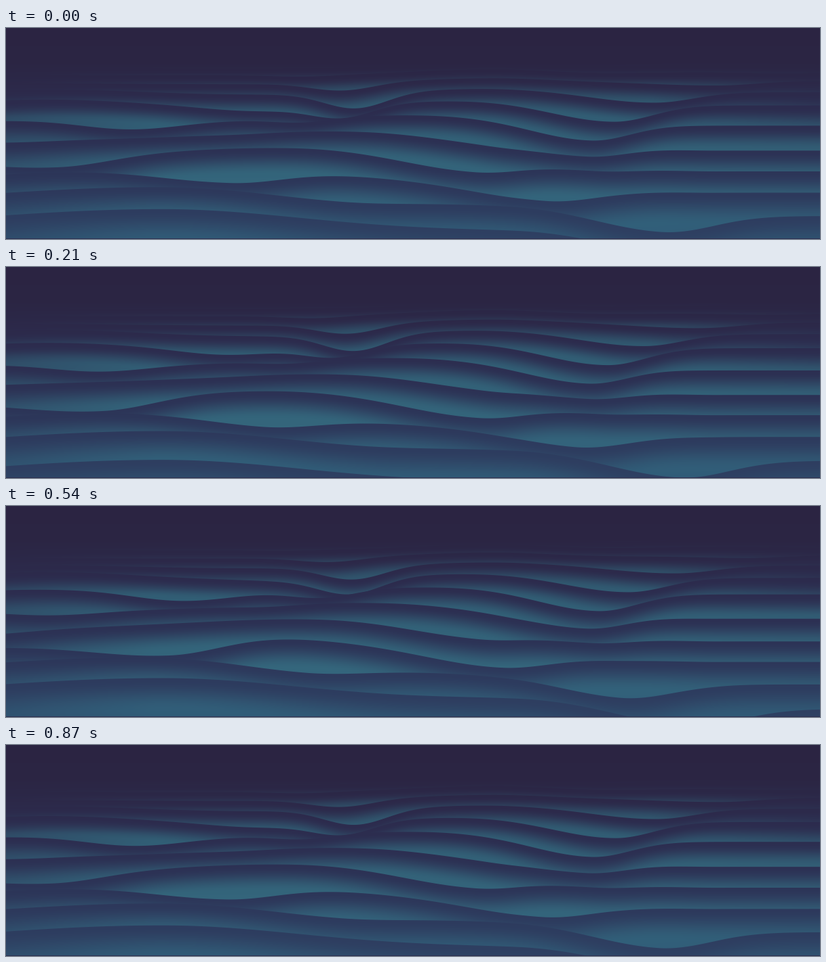
Write an HTML page with a canvas that moves like this. It is 1200 by 312 pixels and loops after 0.9 s.

```html
<!DOCTYPE html>
<html lang="en">
<head>
<meta charset="utf-8">
<title>Night waves</title>
<style>
  html, body { margin: 0; height: 100%; overflow: hidden; background: #2b2442; }
  canvas { display: block; width: 100%; height: 100%; }
</style>
</head>
<body>
<canvas id="sea" width="1200" height="312"></canvas>
<script>
const W = 1200, H = 312, LOOP = 900, STEP = 30;
const FAR = -3, NEAR = 10;
const ctx = document.getElementById('sea').getContext('2d');
const image = ctx.createImageData(W, H);

const clamp = v => Math.max(0, Math.min(1, v));
const lerp = (a, b, t) => a + (b - a) * t;
const smooth = v => { v = clamp(v); return v * v * (3 - 2 * v); };
const bell = (v, center, width) => Math.exp(-(((v - center) / width) ** 2));

// Hills (height < 0) and troughs (height > 0) of the wave at depth u.
// Each drifts sideways and swells or fades as the wave comes nearer.
function swells(u) {
  const swell = (x, height, left, right = left) => ({ x, height, left, right });
  const reach = 120 + 18 * Math.max(0, u);
  return [
    // wide hill sliding from the right to the left
    swell(Math.max(230, 720 - 12 * Math.max(0, u - 1) ** 2),
      -(9 + 0.28 * u * u) * smooth((u + 3) / 3), 1.4 * reach, reach),
    // low hill at the far left
    swell(60, -14 * bell(u, 2.8, 1.2), 200),
    // trough in the middle distance
    swell(515 - 19 * (u - 2) ** 2, 24 * bell(u, 2.3, 1.5), 65),
    // trough leaving to the left
    swell(180 - 190 * (u - 4), 13 * bell(u, 3.8, 1), 100),
    // trough on the right, swinging in and out
    swell(855 + (u < 4.7 ? 14 : 8) * (u - 4.7) ** 2, 26 * bell(u, 3.7, 2.3), 120, 80),
    // trough entering from the left
    swell(75 + 300 * (u - 6) - 45 * (u - 6) ** 2, 26 * bell(u, 6.7, 1), 160, 110),
    // near trough moving off to the right
    swell(690 + 18 * Math.min(0, u - 6) ** 2 + 320 * smooth((u - 6) / 2.6),
      26 * smooth((u - 3.5) / 3.5), 150, 100)
  ];
}

function crestLine(u) {
  const base = 70 + 12 * u + 1.5 * u * u + 40 * Math.max(0, u - 9);
  const tilt = lerp(-5, 16, smooth((u - 3) / 2.5));
  const parts = swells(u);
  return Float32Array.from({ length: W }, (_, x) => {
    let y = base + tilt * smooth((x - 750) / 300);
    for (const s of parts) y += s.height * bell(x, s.x, x < s.x ? s.left : s.right);
    return y;
  });
}

function ramp(stops) {
  const rgb = hex => [1, 3, 5].map(i => parseInt(hex.slice(i, i + 2), 16));
  return Array.from({ length: H }, (_, y) => {
    let i = 0;
    while (i < stops.length - 2 && stops[i + 1][0] < y) i++;
    const [y0, c0] = stops[i], [y1, c1] = stops[i + 1];
    const a = rgb(c0), b = rgb(c1), t = clamp((y - y0) / (y1 - y0));
    return a.map((v, k) => lerp(v, b[k], t));
  });
}
const dark = ramp([[0, '#2b2442'], [50, '#2b2543'], [110, '#2c2b4d'],
  [200, '#2c3356'], [260, '#2d3b5e'], [312, '#2e4062']]);
const light = ramp([[45, '#2b2644'], [60, '#2c3350'], [85, '#2f4c65'],
  [130, '#315d74'], [240, '#34667c'], [312, '#305c78']]);

// Less glow towards the sides, mostly in the distance.
const glow = Float32Array.from({ length: W * H }, (_, i) => {
  const x = i % W, y = Math.floor(i / W);
  const left = 0.7 * clamp(1 - x / 400) * clamp((130 - y) / 50) + 0.35 * clamp(1 - x / 220);
  const right = clamp((x - 950) / 250) * (0.1 + 0.65 * clamp((160 - y) / 50));
  return clamp(1 - left - right);
});

function draw(phase) {
  const lines = [];
  for (let u = FAR; u <= NEAR; u++) lines.push(crestLine(u + phase));
  const amount = new Float32Array(H), ends = [], px = image.data;
  for (let x = 0; x < W; x++) {
    amount.fill(0);
    let end = H;
    for (let i = lines.length - 1; i >= 0; i--) {
      ends[i] = end;
      end = Math.min(end, Math.max(0, Math.ceil(lines[i][x]) + 1));
    }
    lines.forEach((line, i) => {
      const crest = line[x], fade = 15 + 0.125 * crest;
      for (let y = Math.max(0, Math.floor(crest)); y < ends[i]; y++) {
        const lit = smooth((y - crest - 2) / fade) * glow[y * W + x];
        amount[y] = lerp(amount[y], lit, clamp(y + 1 - crest));
      }
    });
    for (let y = 0; y < H; y++) {
      const o = (y * W + x) * 4;
      for (let c = 0; c < 3; c++) px[o + c] = lerp(dark[y][c], light[y][c], amount[y]);
      px[o + 3] = 255;
    }
  }
  ctx.putImageData(image, 0, 0);
  ctx.fillStyle = 'rgba(43, 40, 74, 0.8)';
  ctx.fillRect(0, H - 1, W, 1);
}

const start = performance.now();
let shown = -1;
function tick() {
  const step = Math.floor((performance.now() - start) % LOOP / STEP);
  if (step !== shown) draw((shown = step) * STEP / LOOP);
  requestAnimationFrame(tick);
}
tick();
</script>
</body>
</html>
```
